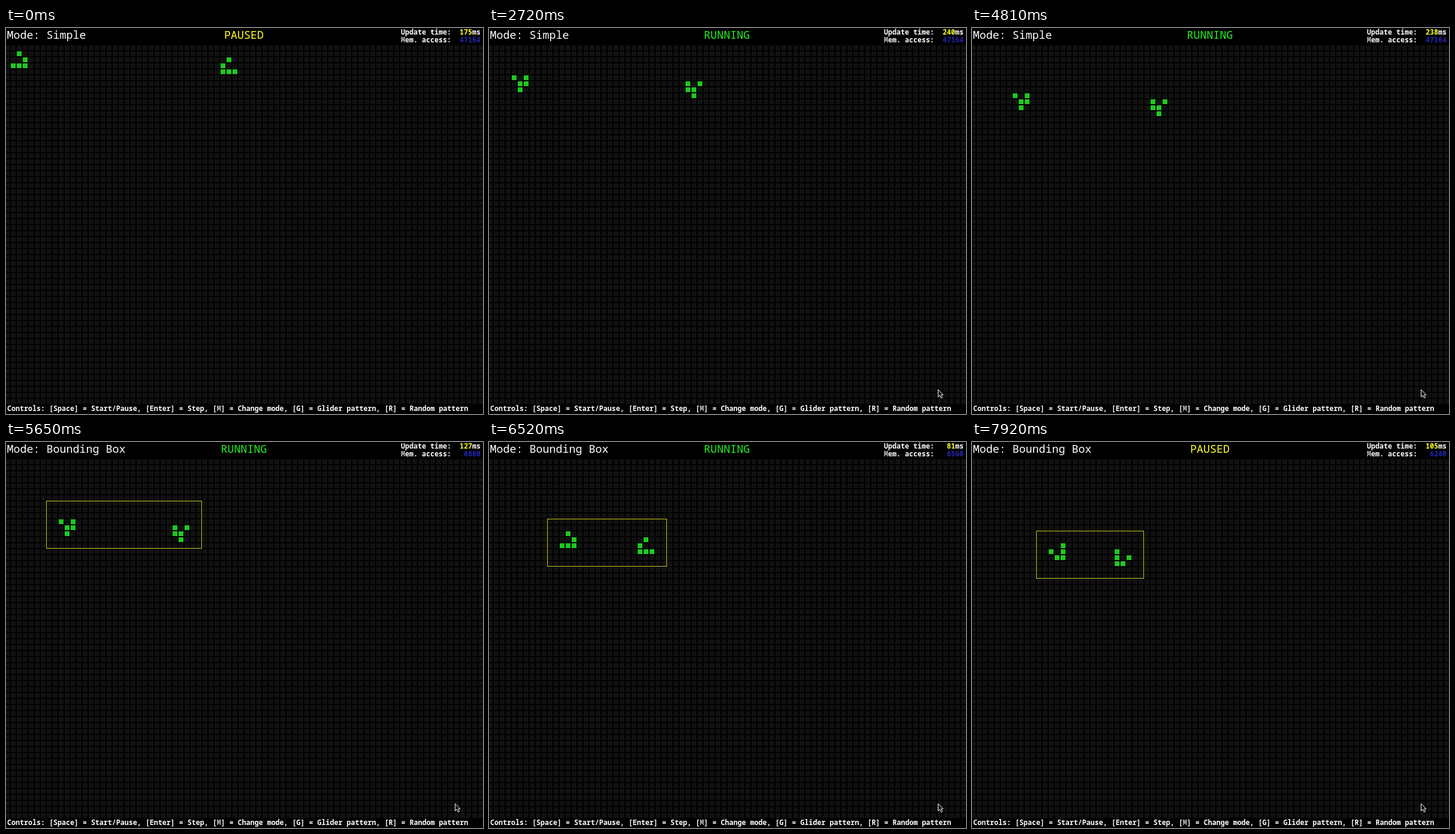
Animation of 796x644 px, one loop 7.99 s. Source, as an HTML page:

```html
<!DOCTYPE html>
<html lang="en">
<head>
<meta charset="utf-8">
<title>Game of Life</title>
<style>
  html, body { margin: 0; width: 100%; height: 100%; overflow: hidden; background: #000; }
  svg { display: block; }
  text { font: bold 11.667px "Noto Sans Mono", monospace; fill: #fff; white-space: pre; }
  .head { font-size: 18.333px; font-weight: 400; }
  .soft { fill: #bbb; }
  #ms { fill: #ffff28; }
  #access { fill: #2424b0; }
</style>
</head>
<body>
<svg width="796" height="644" viewBox="0 0 796 644">
  <defs>
    <pattern id="grid" x="-2" y="29" width="10" height="10" patternUnits="userSpaceOnUse">
      <rect width="8" height="8" fill="#111" shape-rendering="crispEdges"/>
    </pattern>
  </defs>
  <rect width="796" height="644"/>
  <rect y="29" width="796" height="599" fill="url(#grid)"/>
  <g id="cells" fill="#20c820" shape-rendering="crispEdges"></g>
  <rect id="box" fill="none" stroke="#c8c820" shape-rendering="crispEdges"/>
  <text class="head" id="mode" x="1.5" y="18"></text>
  <text class="head" id="state" x="397" y="18" text-anchor="middle"></text>
  <text x="659" y="11">Update time:  <tspan id="ms"></tspan>ms</text>
  <text x="659" y="24"><tspan class="soft">M</tspan>em. access:  <tspan id="access"></tspan></text>
  <text x="2" y="639">Controls: [Space] = Start/Pause, [Enter] = Step, [<tspan class="soft">M</tspan>] = Change mode, [G] = Glider pattern, [R] = Random pattern</text>
  <path id="cursor" d="M.5 .5V12.5L3.3 9.8L5.5 14.5L7.6 13.6L5.4 9H9Z" stroke="#fff"/>
</svg>
<script>
const LOOP = 7990;
const BOX_GEN = 28;
const RUN_START = 820, RUN_END = 6880;
const $ = id => document.getElementById(id);

// Evenly spaced times, rounded to 10 ms.
const spread = (from, to, n) =>
  Array.from({ length: n }, (_, i) => Math.round((from + (to - from) * i / (n - 1)) / 10) * 10);

const cursorTicks = spread(30, 650, 9);
const genTimes = [
  820, 950, 1120, 1250, 1420, 1550, 1720, 1890, 2020, 2220, 2350, 2550, 2720, 2890,
  3060, 3230, 3400, 3530, 3730, 3930, 4130, 4300, 4470, 4640, 4810, 5010, 5180,
  ...spread(5260, 5650, 6), 5750, ...spread(5850, 6590, 11),
  6660, 6740, 6810, 7280, 7640
];
const ticks = [0, ...cursorTicks, ...genTimes, ...spread(6660, 7430, 11), ...spread(7500, 7920, 7)]
  .sort((a, b) => a - b);

const timings = [[0, 175], [1420, 221], [2720, 240], [4810, 238], [5180, 234],
  [5650, 127], [6520, 81], [7920, 105], [LOOP, 105]];
const cursorPath = [[744, 626], [744, 621], [745, 615], [747, 610], [748, 606],
  [750, 604], [750, 603], [749, 604], [749, 603]];

// The four phases of a glider, as column and row digits.
const phases = ["10 21 02 12 22", "01 21 12 22 13", "21 02 22 13 23", "11 22 32 13 23"]
  .map(p => p.split(" ").map(s => [+s[0], +s[1]]));

const cells = Array.from({ length: 10 }, () => {
  const r = document.createElementNS("http://www.w3.org/2000/svg", "rect");
  r.setAttribute("width", 8);
  r.setAttribute("height", 8);
  return $("cells").appendChild(r);
});

const set = (el, attrs) => {
  for (const k in attrs) el.setAttribute(k, attrs[k]);
};
const minCol = gen => (gen >> 2) + (gen % 4 === 3 ? 1 : 0);
const minRow = gen => (gen >> 2) + (gen % 4 ? 1 : 0);
const boxCols = gen => 42 - 2 * minCol(gen);
const place = (el, col, row) => set(el, { x: 8 + 10 * col, y: 39 + 10 * row });

function updateTime(t) {
  const i = timings.findIndex(([end]) => t < end) - 1;
  const [t0, v0] = timings[i], [t1, v1] = timings[i + 1];
  const u = (t - t0) / (t1 - t0);
  return Math.round(v0 + (v1 - v0) * u + 16 * u * (1 - u) * Math.sin(t * 0.05));
}

function draw(t) {
  const gen = genTimes.filter(g => g <= t).length;
  const shift = gen >> 2;
  phases[gen % 4].forEach(([c, r], i) => {
    place(cells[i], shift + c, shift + r);
    place(cells[i + 5], 37 - shift - c, shift + r + 1);
  });

  // The box surrounds the previous generation with a margin of two cells.
  const boxed = gen >= BOX_GEN;
  const prev = Math.max(gen - 1, 0);
  set($("box"), {
    visibility: boxed ? "visible" : "hidden",
    x: 10 * minCol(prev) - 12.5, y: 10 * minRow(prev) + 18.5,
    width: 10 * boxCols(prev) - 1, height: 79
  });

  const running = t >= RUN_START && t < RUN_END;
  $("mode").textContent = "Mode: " + (boxed ? "Bounding Box" : "Simple");
  $("state").textContent = running ? "RUNNING" : "PAUSED";
  $("state").style.fill = running ? "#22ee22" : "#ffff20";
  $("ms").textContent = String(updateTime(t)).padStart(3);
  const access = gen > BOX_GEN ? 4800 + 80 * boxCols(gen - 2) : 47164;
  $("access").textContent = String(access).padStart(5);

  const step = cursorTicks.filter(c => c <= t).length;
  const [x, y] = cursorPath[Math.max(step - 1, 0)];
  set($("cursor"), { visibility: step ? "visible" : "hidden", transform: `translate(${x} ${y})` });
}

let shown = -1;
const start = performance.now();
function frame() {
  const t = (performance.now() - start) % LOOP;
  const tick = ticks.filter(k => k <= t).pop();
  if (tick !== shown) draw(shown = tick);
  requestAnimationFrame(frame);
}
frame();
</script>
</body>
</html>
```
